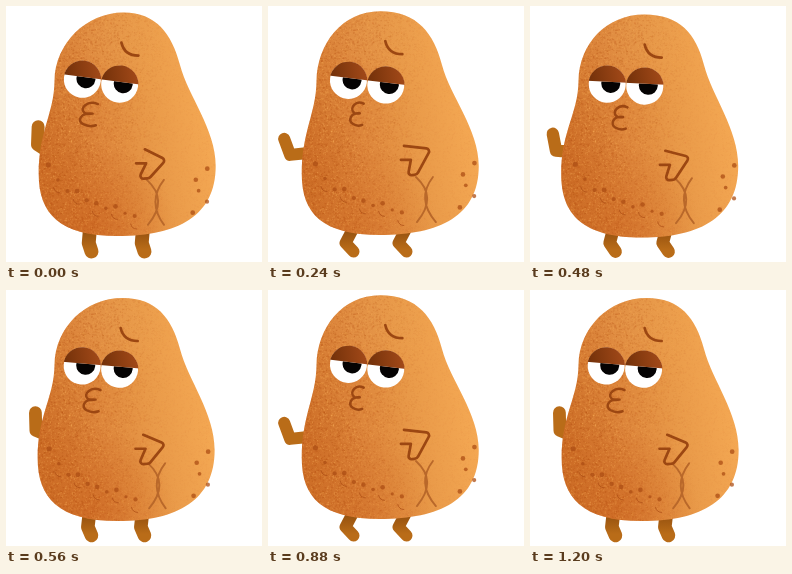
Animation of 256x256 px, one loop 1.28 s. Source, as an HTML page with a canvas:

```html
<!DOCTYPE html>
<html lang="en">
<head>
<meta charset="utf-8">
<title>Potato</title>
<style>
html, body { margin: 0; width: 100%; height: 100%; overflow: hidden; background: #fff; }
canvas { display: block; width: 256px; height: 256px; }
</style>
</head>
<body>
<canvas id="stage" width="256" height="256"></canvas>
<script>
const SIZE = 256, STEP = 80, SWING = 8;
const stage = document.getElementById('stage');
const dpr = window.devicePixelRatio || 1;
stage.width = stage.height = Math.round(SIZE * dpr);
const ctx = stage.getContext('2d');
ctx.scale(dpr, dpr);
ctx.lineCap = ctx.lineJoin = 'round';

const LINE = '#9c4712', LIMB = '#b96c18', SPOT = 'rgba(172,78,20,.75)';

// Every part sways around its rest place once per swing.
function poseAt(step) {
  const a = step / SWING * Math.PI * 2;
  const sway = (rest, c, s) => rest + c * Math.cos(a) + s * Math.sin(a);
  return {
    reach: sway(.6, -.55, 0),
    top: sway(6.6, 0, -2),
    side: sway(-.3, 0, 1.5),
    bottom: sway(230, 0, -1.5),
    eyeX: sway(97, -3, 0) + Math.cos(2 * a),
    eyeY: sway(77.2, -1.4, -2),
    tilt: sway(6, 1.5, 3),
    mouthX: sway(88, -4.5, -2.5),
    mouthY: sway(109.5, -.8, -2.5),
    mouthW: sway(16, 3, .3),
    browX: sway(116, -.6, 1.3),
    handX: sway(0, 0, 1.3),
    handY: sway(142.3, 1, -2.5)
  };
}

function randomizer(seed) {
  return () => (seed = (seed * 16807) % 2147483647) / 2147483647;
}

function makeGrain() {
  const c = document.createElement('canvas');
  c.width = c.height = SIZE;
  const g = c.getContext('2d'), rnd = randomizer(41);
  for (let i = 0; i < 20000; i++) {
    const x = rnd() * SIZE, y = rnd() * SIZE;
    const fade = Math.max(.12, 1 - Math.max(0, x - 75) / 100);
    g.fillStyle = rnd() < .55 ? `rgba(175,75,15,${.22 * fade})` : `rgba(255,185,100,${.22 * fade})`;
    g.fillRect(x, y, 1.2, 1.2);
  }
  return c;
}
const grain = makeGrain();

function stroke(path, color, width) {
  ctx.strokeStyle = color;
  ctx.lineWidth = width;
  ctx.stroke(new Path2D(path));
}

function dot(x, y, r, color) {
  ctx.fillStyle = color;
  ctx.beginPath();
  ctx.arc(x, y, r, 0, Math.PI * 2);
  ctx.fill();
}

function clipped(x, y, w, h, paint) {
  ctx.save();
  ctx.beginPath();
  ctx.rect(x, y, w, h);
  ctx.clip();
  paint();
  ctx.restore();
}

function glow(x, y, r, rgb, alpha) {
  const g = ctx.createRadialGradient(x, y, 0, x, y, r);
  g.addColorStop(0, `rgba(${rgb},${alpha})`);
  g.addColorStop(1, `rgba(${rgb},0)`);
  ctx.fillStyle = g;
  ctx.fillRect(0, 0, SIZE, SIZE);
}

function blend(x0, y0, x1, y1, ...colors) {
  const g = ctx.createLinearGradient(x0, y0, x1, y1);
  colors.forEach((c, i) => g.addColorStop(i / (colors.length - 1), c));
  return g;
}

function limbs({ reach: k, side }) {
  stroke(`M40 ${144 + 3 * k}L${32 - 10 * k} ${138 + 11 * k}L${33 - 17 * k} ${120 + 13 * k}`, LIMB, 13 - k);
  const shade = blend(0, 224, 0, 244, '#94500f', LIMB);
  for (const hip of [84, 137]) {
    stroke(`M${hip + side / 2} 224L${hip - 1 - 5.5 * k} 237L${hip + 1.5} 245.5`, shade, 14 - 2 * k);
  }
}

function body({ reach, top, side, bottom: b }) {
  const tx = 118 - 6 * reach, l = 33 + side, r = 210 + side;
  const shape = new Path2D(`M${tx} ${top}
    C${tx - 38} ${top} 49 38 48.5 75 C48 108 ${l} 125 ${l} 168
    C${l} 208 ${l + 21} ${b} 112 ${b} C172 ${b} ${r} 210 ${r} 160
    C${r} 123 182 90 174 59 C166 28 150 ${top} ${tx} ${top}Z`);
  ctx.save();
  ctx.clip(shape);
  ctx.fillStyle = blend(34, 130, 200, 100, '#d0742c', '#dc843a', '#e99a49', '#f4a853');
  ctx.fillRect(0, 0, SIZE, SIZE);
  glow(85, 220, 85, '196,86,20', .45 - .2 * reach);
  glow(30, 150, 65, '196,88,22', .25);
  glow(100, 30, 60, '232,160,84', .3);
  ctx.drawImage(grain, 0, 0);
  ctx.restore();
}

function skin(k) {
  const rnd = randomizer(7);
  const place = (x, y) => [x + 5.5 * k, y - 6 * k * x / 200];
  for (let i = 0; i < 10; i++) {
    const x = 42 + 9.6 * i, y = 165 + 43 * (i / 9) ** .6 + 12 * (rnd() - .5);
    dot(...place(x, y), 1.5 + 1.2 * rnd(), SPOT);
    if (i % 2) stroke(`M${place(x - 4, y + 8)}q1 5 6 5`, SPOT, 1);
  }
  for (let i = 0; i < 5; i++) {
    dot(...place(180 + 21 * Math.abs(Math.cos(i * 1.1)), 163 + 11 * i), 1.8 + .6 * rnd(), SPOT);
  }
  const c = 150.5 + 7.5 * k, y = 174 - 3 * k;
  stroke(`M${c - 10} ${y}Q${c + 12} ${y + 20} ${c - 9} ${y + 45}
    M${c + 7} ${y}Q${c - 10} ${y + 22} ${c + 7 + 3 * k} ${y + 45}`, '#b9682a', 1.9);
}

function eye(x) {
  dot(x, 0, 18.5, '#fff');
  clipped(x - 20, -2.5, 40, 24, () => dot(x + 3.5, -1, 9.5, '#050303'));
  const lid = blend(x - 16, 0, x + 16, -8, '#75320a', '#a04818');
  clipped(x - 20, -21, 40, 18.5, () => dot(x, 0, 18.8, lid));
}

function face(p) {
  ctx.save();
  ctx.translate(p.eyeX, p.eyeY);
  ctx.rotate(p.tilt * Math.PI / 180);
  eye(-18.8);
  eye(18.8);
  ctx.restore();

  const at = (x, y) => `${p.mouthX + x * p.mouthW / 18} ${p.mouthY + y * 1.06} `;
  stroke(`M${at(8, -10)}C${at(-2, -14)}${at(-10, -6)}${at(-5, -2)}Q${at(-3, 0)}${at(3, -1)}
    C${at(-9, -2)}${at(-12, 6)}${at(-6, 9)}Q${at(0, 12)}${at(6, 10)}`, LINE, 2.5);
  stroke(`M${p.browX} ${p.top + 30}q3 13 17 13`, LINE, 2.7);
}

// The fist opens from a slanted wedge to a squarer bend.
function hand({ reach: k, handX: x, handY: y }) {
  ctx.strokeStyle = LINE;
  ctx.lineWidth = 2.7;
  ctx.beginPath();
  ctx.moveTo(x + 139 - 4 * k, y);
  ctx.arcTo(x + 160 + 2 * k, y + 11 - 8 * k, x + 143 + 5 * k, y + 28, 3);
  ctx.arcTo(x + 143 + 5 * k, y + 29, x + 130 + 9 * k, y + 29, 4);
  ctx.arcTo(x + 132 + 7 * k, y + 30, x + 140 + 2 * k, y + 14, 3);
  ctx.lineTo(x + 140 + 2 * k, y + 14);
  ctx.lineTo(x + 130 + 2 * k, y + 14);
  ctx.stroke();
}

function draw(pose) {
  ctx.fillStyle = '#fff';
  ctx.fillRect(0, 0, SIZE, SIZE);
  limbs(pose);
  body(pose);
  skin(pose.reach);
  face(pose);
  hand(pose);
}

let start = null, shown = 0;
function tick(now) {
  if (start === null) start = now;
  const step = Math.floor((now - start) / STEP) % SWING;
  if (step !== shown) draw(poseAt(shown = step));
  requestAnimationFrame(tick);
}
draw(poseAt(0));
requestAnimationFrame(tick);
</script>
</body>
</html>
```
